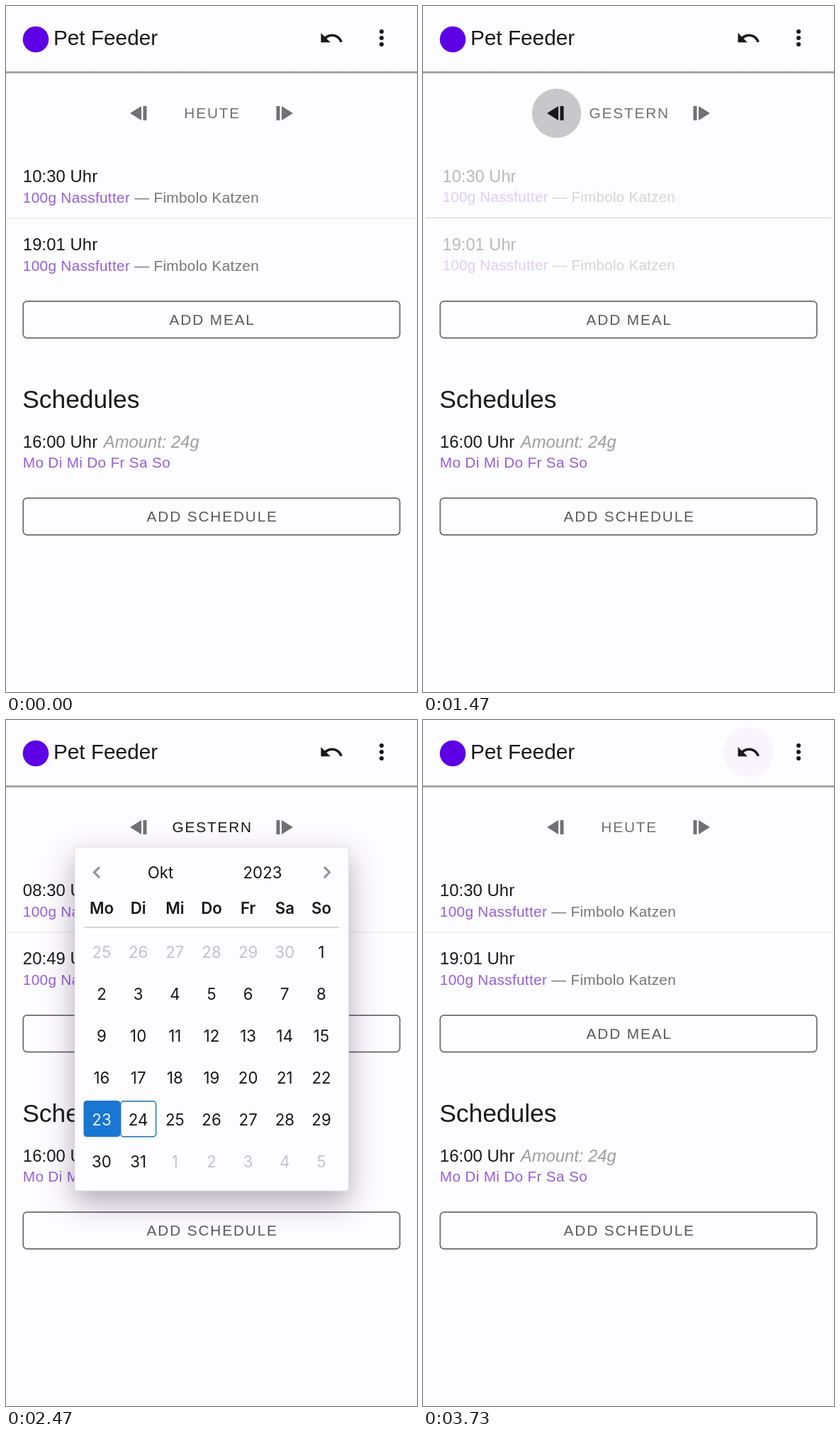
Recreate the animation shown at these times as an HTML page. Size 580 px wide and 966 px high, loop 3760 ms.

```html
<!DOCTYPE html>
<html lang="de">
<head>
<meta charset="utf-8">
<title>Pet Feeder</title>
<style>
  html, body { margin: 0; width: 100%; height: 100%; overflow: hidden; background: #fdfcff; }
  svg { display: block; width: 580px; height: 966px; }
  text { font-family: "Liberation Sans", Arial, sans-serif; fill: #19171b; }
  .title { font-size: 29.74px; }
  .head { font-size: 35.4px; }
  .main { font-size: 23.8px; letter-spacing: .1px; }
  .sub { font-size: 20.8px; letter-spacing: .3px; fill: #77747a; }
  .sub .accent, .accent { fill: #955fd8; }
  .amount { font-size: 23.8px; font-style: italic; fill: #a09da3; }
  .btn { font-size: 20.8px; letter-spacing: 1.86px; text-anchor: middle; fill: #5c585e; }
  .box { fill: none; stroke: #555158; stroke-width: 1.4; }
  #cal text { font-family: Inter, "Open Sans", sans-serif; font-size: 22.3px; text-anchor: middle; }
  #cal .week { font-weight: 600; }
  #cal .off { fill: #c6c2cd; }
  #cal .sel { fill: #eaf3ff; }
  #panel { fill: #fdfcff; stroke: #e2dfe6; filter: drop-shadow(0 16px 20px rgba(40, 25, 50, .36)); }
</style>
</head>
<body>
<svg viewBox="0 0 580 966" xmlns="http://www.w3.org/2000/svg">
  <defs>
    <linearGradient id="edge" x1="0" y1="0" x2="0" y2="1">
      <stop offset="0" stop-color="#b4b1b6"/>
      <stop offset=".35" stop-color="#949196"/>
      <stop offset="1" stop-color="#fdfcff"/>
    </linearGradient>
    <clipPath id="labelClip"><rect x="217" y="125" width="146" height="53" rx="6"/></clipPath>
  </defs>
  <rect width="580" height="966" fill="#fdfcff"/>

  <rect y="92" width="580" height="4" fill="url(#edge)"/>
  <circle cx="42" cy="47" r="18.3" fill="#5d00e6"/>
  <text class="title" x="67" y="55.3">Pet Feeder</text>
  <circle id="undoHover" cx="459" cy="45" r="35" fill="#c79be6"/>
  <circle id="undoRipple" cx="459" cy="45"/>
  <path transform="translate(441.5 27.5) scale(1.487)" fill="#19171b" d="M12.5 8c-2.65 0-5.05.99-6.9 2.6L2 7v9h9l-3.62-3.62c1.39-1.16 3.16-1.88 5.12-1.88 3.54 0 6.55 2.31 7.6 5.5l2.37-.78C21.08 11.03 17.15 8 12.5 8z"/>
  <g fill="#19171b">
    <circle cx="530" cy="36.1" r="3"/><circle cx="530" cy="45" r="3"/><circle cx="530" cy="53.9" r="3"/>
  </g>

  <circle id="prevRipple" cx="188.5" cy="151"/>
  <circle id="nextRipple" cx="391.5" cy="151"/>
  <g clip-path="url(#labelClip)"><circle id="labelRipple" cx="290.5" cy="151"/></g>
  <path id="prev" d="M175 151L191 141V161ZM193.5 141H198.5V161H193.5Z"/>
  <path id="next" d="M405 151L389 141V161ZM386.5 141H381.5V161H386.5Z"/>
  <text id="label" class="btn" x="291.2" y="158"></text>

  <g id="days"></g>

  <g id="addMeal">
    <rect class="box" x="24.2" y="415.7" width="531.6" height="51.8" rx="5.5"/>
    <text class="btn" x="291.2" y="448.7">ADD MEAL</text>
  </g>
  <g id="schedules">
    <text class="head" x="23.2" y="566.2">Schedules</text>
    <text class="main" x="23.8" y="622">16:00 Uhr</text>
    <text class="amount" x="137.8" y="622">Amount: 24g</text>
    <text class="sub" x="23.8" y="650"><tspan class="accent">Mo Di Mi Do Fr Sa So</tspan></text>
    <rect class="box" x="24.2" y="693" width="531.6" height="51.8" rx="5.5"/>
    <text class="btn" x="291.2" y="726">ADD SCHEDULE</text>
  </g>

  <g id="cal"></g>
</svg>
<script>
const LOOP = 3760, ROW = 96;
const GREY = '#727076', DARK = '#19171b';
const $ = id => document.getElementById(id);
const clamp = x => Math.max(0, Math.min(1, x));
const ramp = (t, a, b) => clamp((t - a) / (b - a));
const smooth = x => x * x * (3 - 2 * x);
const cubicOut = x => 1 - (1 - x) ** 3;
const mix = (a, b, p) => a + (b - a) * p;

const days = [
  { label: 'HEUTE', meals: ['10:30', '19:01'] },
  { label: 'MORGEN', meals: [] },
  { label: 'GESTERN', meals: ['08:30', '20:49'] },
  { label: '18.10.2023', meals: ['08:30', '13:30', '19:01'] }
];
const steps = [
  { at: -1000, day: 0 }, { at: 60, day: 1 }, { at: 650, day: 0 },
  { at: 1365, day: 2 }, { at: 2700, day: 3 }, { at: 3240, day: 0 }
];
const ripples = [
  { id: 'nextRipple', at: 60, r: 36.5, alpha: .21 },
  { id: 'prevRipple', at: 650, r: 36.5, alpha: .21 },
  { id: 'prevRipple', at: 1365, r: 36.5, alpha: .21 },
  { id: 'labelRipple', at: 2060, r: 70, alpha: .26 },
  { id: 'undoRipple', at: 3240, r: 36, alpha: .21 }
];

function mealRow(time, i, count) {
  const y = 203 + i * ROW;
  const line = i < count - 1
    ? `<line class="rule" x2="580" y1="${y + 96}" y2="${y + 96}"/>` : '';
  return `<g class="item" data-y="${y + 48}"><g class="words">
    <text class="main" x="23.8" y="${y + 45.4}">${time} Uhr</text>
    <text class="sub" x="23.8" y="${y + 73.5}"><tspan class="accent">100g Nassfutter</tspan> — Fimbolo Katzen</text>
    </g>${line}</g>`;
}

function buildDays() {
  const empty = `<g class="item" data-y="252"><g class="words">
    <text class="main" x="23.8" y="260.3">Keine Meals für diesen Tag</text></g></g>`;
  $('days').innerHTML = days.map(d => '<g>' +
    (d.meals.length ? d.meals.map((m, i) => mealRow(m, i, d.meals.length)).join('') : empty) +
    '</g>').join('');
  days.forEach((d, i) => {
    d.el = $('days').children[i];
    d.shift = (Math.max(1, d.meals.length) - 2) * ROW;
  });
}

function buildCalendar() {
  const colX = c => 135 + c * 51.67;
  const word = (x, y, s, cls = '') => `<text class="${cls}" x="${x}" y="${y + 8.1}">${s}</text>`;
  let out = `<rect id="panel" x="97" y="179" width="386.5" height="484" rx="4"/>
    <path d="M132 207L124.5 214.5L132 222M449 207L456.5 214.5L449 222" fill="none" stroke="#918d99" stroke-width="3"/>
    <path d="M110 292H470" stroke="#cbc8ce" stroke-width="1.4"/>
    <rect x="109.5" y="536" width="52" height="51" rx="4.5" fill="#1976d2"/>
    <rect x="161.7" y="536.7" width="50" height="50" rx="4.5" fill="#fdfcff" stroke="#1a70b8" stroke-width="1.4"/>`;
  out += word(218, 214.5, 'Okt') + word(362, 214.5, '2023');
  'Mo Di Mi Do Fr Sa So'.split(' ').forEach((s, i) => out += word(colX(i), 265, s, 'week'));
  for (let i = 0; i < 42; i++) {
    const n = i - 5;
    const day = n < 1 ? n + 30 : n > 31 ? n - 31 : n;
    const cls = n < 1 || n > 31 ? 'off' : n === 23 ? 'sel' : '';
    out += word(colX(i % 7), 327 + Math.floor(i / 7) * 59, day, cls);
  }
  $('cal').innerHTML = out;
}

function showDay(day, o) {
  day.el.setAttribute('visibility', o > 0 ? 'visible' : 'hidden');
  const s = 1 - .02 * (1 - o);
  day.el.querySelectorAll('.item').forEach(el => {
    const y = +el.dataset.y;
    el.setAttribute('transform', `translate(290 ${y}) scale(${s}) translate(-290 ${-y})`);
    el.firstElementChild.setAttribute('opacity', o);
    const rule = el.querySelector('.rule');
    if (rule) {
      rule.setAttribute('stroke', o < 1 ? '#b0aeb2' : '#e5e3e7');
      rule.setAttribute('opacity', clamp(2.2 * o));
    }
  });
}

function drawRipples(t) {
  for (const p of ripples) $(p.id).setAttribute('opacity', 0);
  for (const p of ripples) {
    const s = t - p.at;
    if (s < 0 || s > 400) continue;
    $(p.id).setAttribute('r', p.r * (.3 + .7 * cubicOut(ramp(s, 0, 180))));
    $(p.id).setAttribute('opacity', p.alpha * ramp(s, -20, 40) * (1 - ramp(s, 200, 390)));
  }
  $('undoHover').setAttribute('opacity', .08 * ramp(t, 3140, 3190) * (1 - ramp(t, 3740, 3760)));
}

function drawCalendar(t) {
  const o = ramp(t, 2120, 2184) * (1 - ramp(t, 2700, 2840));
  const p = smooth(ramp(t, 2120, 2235));
  $('cal').setAttribute('visibility', o > 0 ? 'visible' : 'hidden');
  $('cal').setAttribute('opacity', o);
  $('cal').setAttribute('transform',
    `translate(290 179) scale(${mix(.745, 1, p)} ${mix(.65, 1, p)}) translate(-290 -179)`);
}

function draw(t) {
  let i = steps.length - 1;
  while (steps[i].at > t) i--;
  const now = days[steps[i].day], old = days[steps[Math.max(0, i - 1)].day];
  const s = t - steps[i].at;

  for (const d of days) showDay(d, 0);
  if (s < 150) showDay(old, 1 - s / 150);
  if (s > 235) showDay(now, ramp(s, 235, 430));

  const move = (id, from) => {
    const y = mix(old.shift, now.shift, cubicOut(ramp(s, from, from + 200)));
    $(id).setAttribute('transform', `translate(0 ${y})`);
  };
  move('addMeal', 101);
  move('schedules', 147);

  const tint = (id, a, b) => $(id).style.fill = t >= a && t < b ? DARK : GREY;
  tint('next', 60, 630);
  tint('prev', 650, 2040);
  tint('label', 2060, 2700);
  $('label').textContent = now.label;

  drawRipples(t);
  drawCalendar(t);
}

buildDays();
buildCalendar();
const start = performance.now();
function tick() {
  draw((performance.now() - start) % LOOP);
  requestAnimationFrame(tick);
}
tick();
</script>
</body>
</html>
```
